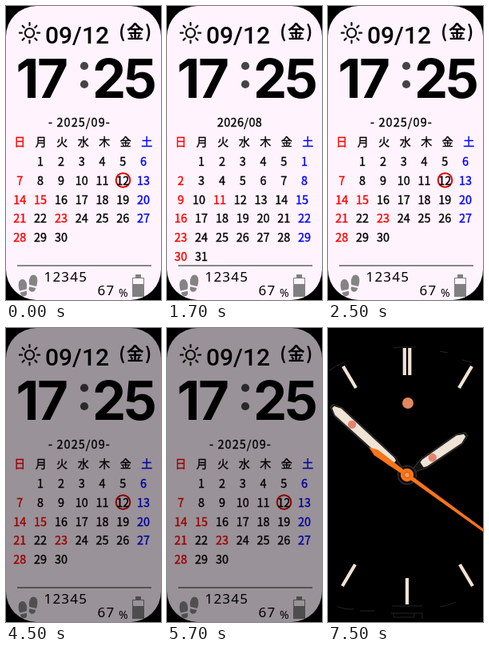
Recreate the animation shown at these times as an HTML page. Size 194 by 368 pixels, loop 8 s.

```html
<!DOCTYPE html>
<html lang="ja">
<head>
<meta charset="utf-8">
<style>
html, body { margin: 0; width: 100%; height: 100%; overflow: hidden; background: #000; }
svg { display: block; width: 194px; height: 368px; }
.date { font: 500 30px Roboto, sans-serif; }
.time { font: 700 67px Inter, sans-serif; }
.day { font: 700 21.5px "Noto Sans CJK JP", sans-serif; letter-spacing: 1.5px; }
.cal {
  font: 400 14.4px "Noto Sans CJK JP", sans-serif; text-anchor: middle;
  fill: currentColor; stroke: currentColor; stroke-width: .35px;
}
.stat { font: 500 17px "Noto Sans", sans-serif; letter-spacing: 1.2px; }
</style>
</head>
<body>
<svg id="stage" viewBox="0 0 194 368" xmlns="http://www.w3.org/2000/svg">
  <defs>
    <path id="shoe" d="M-4 7.5Q-6.5 0-4.5-4.5Q-1.5-8.5 2.5-6Q6.5-1 4.6 5.5ZM-3.2 9.5L4.8 7.7Q6.5 13 2 14.2Q-2.6 14.4-3.2 9.5Z"/>
  </defs>
  <rect width="194" height="368"/>

  <g id="digital">
    <rect width="194" height="368" rx="38" fill="#fff3fd"/>
    <g transform="translate(29.5 33.7)" stroke="#111" stroke-width="2.2" fill="none">
      <circle r="5.7"/>
      <g id="rays" stroke-linecap="round"/>
    </g>
    <text class="date" x="49" y="46.5">09/12</text>
    <text class="day" x="162.5" y="39.5" text-anchor="middle">(金)</text>
    <text class="time" x="12.5" y="114.5" letter-spacing="-2.5">17</text>
    <text class="time" x="108" y="114.5" letter-spacing="-3">25</text>
    <g fill="#444"><circle cx="98" cy="75" r="5.1"/><circle cx="98" cy="98" r="5.1"/></g>

    <g id="week" class="cal" style="font-size:14px"></g>
    <g id="september" class="cal">
      <text x="92" y="151" letter-spacing="1.1">- 2025/09-</text>
      <circle cx="146.5" cy="218" r="8.8" fill="none" stroke="#e00000" stroke-width="2"/>
    </g>
    <g id="august" class="cal">
      <text x="91" y="151" letter-spacing=".4">2026/08</text>
    </g>

    <rect x="14" y="324" width="168" height="2" fill="#888"/>
    <g fill="#848484">
      <use href="#shoe" transform="translate(21 349)"/>
      <use href="#shoe" transform="translate(34 343.5) scale(-1 1)"/>
    </g>
    <text class="stat" x="47.5" y="345">12345</text>
    <text class="stat" x="114.5" y="362">67</text>
    <text class="stat" x="141" y="363.5" style="font-size:14px">%</text>
    <path d="M162 336h7v4h4v24h-15v-24h4z" fill="#808080"/>
    <rect x="159" y="341" width="13" height="7" fill="#fff3fd"/>
    <rect id="dim" width="194" height="368" opacity=".4"/>
  </g>

  <g id="analog">
    <g fill="none" stroke="#252525">
      <path d="M2 53Q10 47 20 43M82 25Q90 23 110 24M140 29l10 2M168 40l12 3"/>
      <path d="M12 349q10 4 20 3M40 354h18M140 349q12-2 20-6"/>
      <path d="M80 348h38M79 357h39v7M82 357v5h26v-5"/>
    </g>
    <g stroke="#efe3d3" stroke-width="4.2">
      <path d="M95.8 25v34M102.3 25v34M180 48L164 75M19 48L35 75M34 296L18 323M165 296L181 323M99 313v33"/>
    </g>
    <circle cx="100" cy="94" r="7" fill="#e08860"/>
    <g transform="translate(99 184)">
      <g id="hour"></g>
      <g id="minute"></g>
      <circle r="11.5" fill="#0a0a0a" stroke="#303030" stroke-width="1.5"/>
      <g id="second" fill="#fb7419">
        <path d="M-2.6 0L-1.6-130H1.6L2.6 0L4.2 48L0 59L-4.2 48Z"/>
      </g>
      <circle r="8.2" fill="#fb7419"/>
      <circle r="3.6" fill="#ff9a4c" stroke="#c9540c"/>
    </g>
  </g>
</svg>
<script>
const $ = id => document.getElementById(id);
const LOOP = 8000;
const BLACK = '#000', RED = '#f00', BLUE = '#00f';

function add(parent, tag, attrs, text) {
  const el = document.createElementNS('http://www.w3.org/2000/svg', tag);
  for (const key in attrs) el.setAttribute(key, attrs[key]);
  if (text !== undefined) el.textContent = text;
  parent.appendChild(el);
  return el;
}

for (let a = 0; a < 360; a += 45)
  add($('rays'), 'path', { d: 'M0-9.6V-12.6', transform: `rotate(${a})` });

const colour = (col, holiday) => holiday || col === 0 ? RED : col === 6 ? BLUE : BLACK;

[...'日月火水木金土'].forEach((name, col) =>
  add($('week'), 'text', { x: 17.3 + 26.5 * col, y: 175, color: colour(col) }, name));

function drawDay(group, day, cell, holiday, mixedRow) {
  const col = cell % 7, row = Math.floor(cell / 7);
  const shift = day >= 10 && mixedRow ? -3 : 0;
  add(group, 'text', {
    x: 17.3 + 25.8 * col + shift, y: 200 + 23.8 * row, color: colour(col, holiday)
  }, day);
}

function drawMonth(group, first, count, holidays, mixed) {
  for (let day = 1; day <= count; day++) {
    const cell = first + day - 1;
    drawDay(group, day, cell, holidays.includes(day), Math.floor(cell / 7) === mixed);
  }
}

drawMonth($('september'), 1, 30, [15, 23]);
drawMonth($('august'), 6, 31, [11], 2);
// Weekday cells left standing in the first row
for (let day = 1; day <= 5; day++) drawDay($('august'), day, day);

function drawHand(group, length, dot) {
  add(group, 'path', {
    d: `M-1.5-8L-6.5-25L-7-${length - 9}L-2.5-${length + 2}H2.5L7-${length - 9}L6.5-25L1.5-8Z`,
    fill: '#111', stroke: '#333', 'stroke-width': 1.2
  });
  add(group, 'path', {
    d: `M-3.5-23L-4.7-27L-5.2-${length - 9}L-1.5-${length - 1}H1.5L5.2-${length - 9}L4.7-27L3.5-23Z`,
    fill: '#efe3d5', stroke: '#efe3d5', 'stroke-linejoin': 'round'
  });
  add(group, 'circle', { cy: -dot, r: 5.2, fill: '#e48470' });
}
drawHand($('hour'), 88, 38.5);
drawHand($('minute'), 126, 93.5);

const show = (id, on) => $(id).setAttribute('display', on ? 'inline' : 'none');
const turn = (id, angle) => $(id).setAttribute('transform', `rotate(${angle})`);

function setHands(hour, minute, second) {
  turn('hour', hour);
  turn('minute', minute);
  turn('second', second);
}

function render(ms) {
  const t = ms % LOOP;
  const nextYear = t >= 500 && t < 2500;
  const analog = t >= 6500;
  show('digital', !analog);
  show('analog', analog);
  show('august', nextYear);
  show('september', !nextYear);
  show('dim', t >= 4500);
  if (t < 7500) setHands(311, 150, 66);
  else setHands(55.5, 312.5, 126);
}

const start = performance.now();
function tick() {
  render(performance.now() - start);
  requestAnimationFrame(tick);
}
tick();
</script>
</body>
</html>
```
